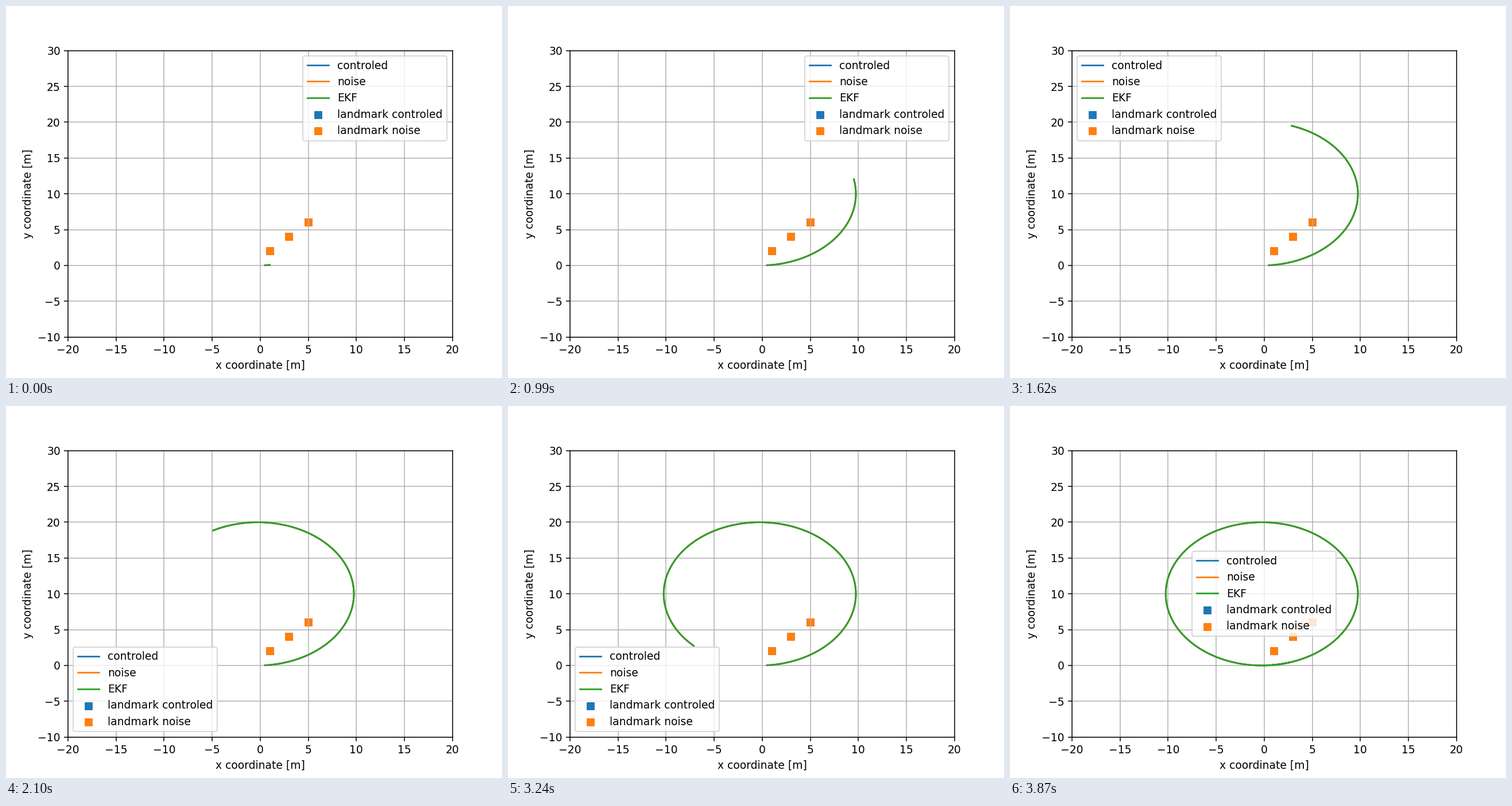
A matplotlib script that plays this animation: 864 px wide and 648 px high, repeating every 3900 ms.

```python
import numpy as np
import matplotlib.pyplot as plt
from matplotlib.animation import FuncAnimation

FRAMES = 130
INTERVAL = 30      # ms
STEP = 0.5         # distance travelled per step [m]
TURN = 0.05        # heading change per step [rad]

# Dead reckoning: turn first, then move along the new heading
heading = TURN * np.arange(1, FRAMES + 2)
xs = np.cumsum(STEP * np.cos(heading))
ys = np.cumsum(STEP * np.sin(heading))

fig, ax = plt.subplots(figsize=(6.4, 4.8), dpi=135)
paths = [ax.plot([], [], label=name)[0] for name in ("controled", "noise", "EKF")]

landmarks = np.array([(1, 2), (3, 4), (5, 6)])
for name, color in (("controled", "C0"), ("noise", "C1")):
    ax.scatter(*landmarks.T, marker="s", color=color, label=f"landmark {name}")

ax.set(xlim=(-20, 20), ylim=(-10, 30),
       xlabel="x coordinate [m]", ylabel="y coordinate [m]")
ax.grid(True)
ax.legend(loc="best")  # relocates on each draw to avoid the path


def update(i):
    n = i + 2
    for path in paths:
        path.set_data(xs[:n], ys[:n])
    return paths


anim = FuncAnimation(fig, update, frames=FRAMES, interval=INTERVAL,
                     repeat=True, repeat_delay=0)
plt.show()
```
